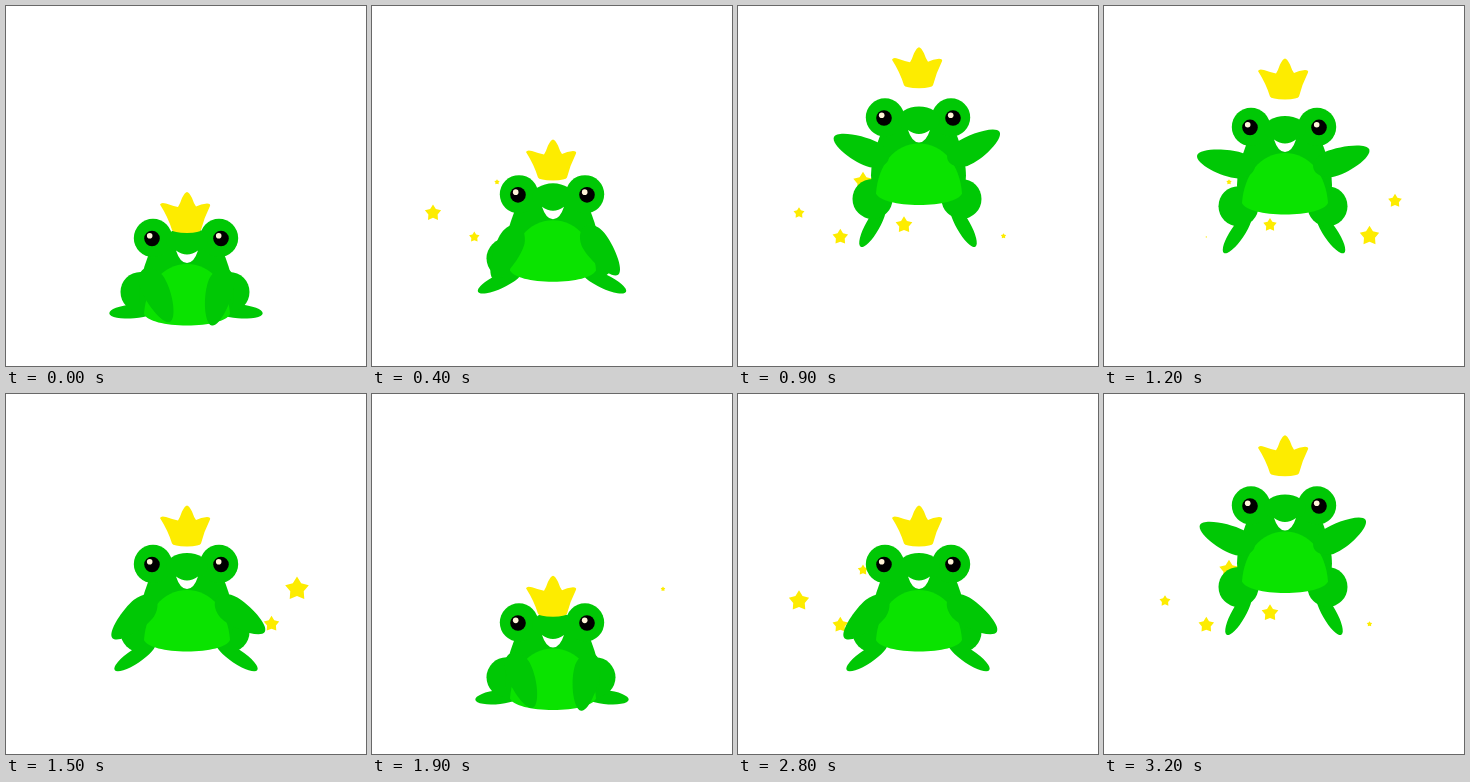
These frames come from a looping animation (360 px wide and 360 px high, 3.23 s). An HTML page with a canvas:

```html
<!DOCTYPE html>
<html lang="en">
<head>
<meta charset="utf-8">
<title>Jumping frog</title>
<style>
html, body { margin: 0; width: 100%; height: 100%; overflow: hidden; background: #fff; }
canvas { display: block; }
</style>
</head>
<body>
<canvas id="stage" width="360" height="360"></canvas>
<script>
const ctx = document.getElementById('stage').getContext('2d');
const LOOP = 3230, CYCLE = 2300, STEP = 100, RISE = 1000, GROW = 600;
const SKIN = '#00c805', BELLY = '#0ae300', GOLD = '#fdec00';

// x, y, full radius, start time
const stars = [
  [61, 207, 11.5, 0], [102.3, 231, 11, 100], [125, 176, 11, 200],
  [166, 219, 9.5, 400], [265.5, 230, 11, 700], [291, 195, 12.5, 870]
];

const body = new Path2D('M150 232C142 248 133 272 133 290C133 311 155 318 181 318S228 311 228 290C228 272 219 248 211 232Z');
const belly = new Path2D('M138 308C140 280 156 258 181 258S222 280 224 308C221 315 203 319.5 181 319.5S141 315 138 308Z');
// Hangs down from the shoulder, fuller on the right
const arm = new Path2D('M0-9C5-9 11-5 14 5C17 22 9 50 1 50S-13 22-12 8C-11-2-6-9 0-9Z');
const mouth = new Path2D('M170 244.5Q181 252.5 192 244.5Q188 257 181 257Q174 257 170 244.5Z');
const crown = new Path2D('M154 198.5Q155 196 160 197.5Q167 200 172 201Q174 198 176 192Q179 186 181 186Q183 186 186 192Q188 198 190 200.5Q195 198 201 197.5Q205 197.5 204 200Q198 212 195 224Q194 226.5 181 227Q167 226.5 166 224Q162 211 154 198.5Z');

const clamp = v => Math.max(0, Math.min(1, v));
const smooth = v => { v = clamp(v); return v * v * (3 - 2 * v); };
// Eases from 0 to 1 and back, each way taking `half` ms
const pulse = (t, half) => smooth(1 - Math.abs(t - half) / half);

function fill(path, color) {
  ctx.fillStyle = color;
  ctx.fill(path);
}

function oval(x, y, rx, ry, color) {
  ctx.fillStyle = color;
  ctx.beginPath();
  ctx.ellipse(x, y, rx, ry, 0, 0, 2 * Math.PI);
  ctx.fill();
}

// Draws in a moved frame; side 1 is mirrored to face right
function at(x, y, degrees, side, draw) {
  ctx.save();
  ctx.translate(x, y);
  ctx.scale(-side, 1);
  ctx.rotate(degrees * Math.PI / 180);
  draw();
  ctx.restore();
}

function star(x, y, r) {
  ctx.beginPath();
  for (let i = 0; i < 10; i++) {
    const a = i * Math.PI / 5, d = i % 2 ? r * 0.57 : r;
    ctx.lineTo(x + d * Math.sin(a), y - d * Math.cos(a));
  }
  ctx.fillStyle = GOLD;
  ctx.fill();
}

function legs(up) {
  for (const side of [-1, 1]) {
    const x = 180 + side * (29.5 + 4 * up);
    at(x, 304 - 107 * up, -5 - 57 * up, side, () => oval(-23, -0.7, 24.3, 7, SKIN));
    oval(179 + side * 44.5, 286 - 95.7 * up, 20, 20, SKIN);
  }
}

function torso(up) {
  fill(body, SKIN);
  fill(belly, BELLY);
  at(142, 271, -25 + 143 * up, -1, () => fill(arm, SKIN));
  at(218, 271, -13 + 137.5 * up, 1, () => fill(arm, SKIN));
}

function head() {
  for (const x of [147, 213]) oval(x, 232, 19.2, 19.2, SKIN);
  oval(181, 234.5, 21, 13.5, SKIN);
  fill(mouth, '#fff');
  for (const x of [146, 215]) {
    oval(x, 232.5, 7.8, 7.8, '#000');
    oval(x - 2.3, 229.8, 2.8, 2.8, '#fff4d8');
  }
}

function render(now) {
  const t = Math.floor(now % LOOP / STEP) * STEP % CYCLE;
  const up = pulse(t, RISE);
  ctx.fillStyle = '#fff';
  ctx.fillRect(0, 0, 360, 360);
  for (const [x, y, r, start] of stars) star(x, y, r * pulse(t - start, GROW));
  legs(up);
  at(0, -124 * up, 0, -1, () => { torso(up); head(); });
  at(0, -149 * up, 0, -1, () => fill(crown, GOLD));
}

const begin = performance.now();
function tick() {
  render(performance.now() - begin);
  requestAnimationFrame(tick);
}
tick();
</script>
</body>
</html>
```
